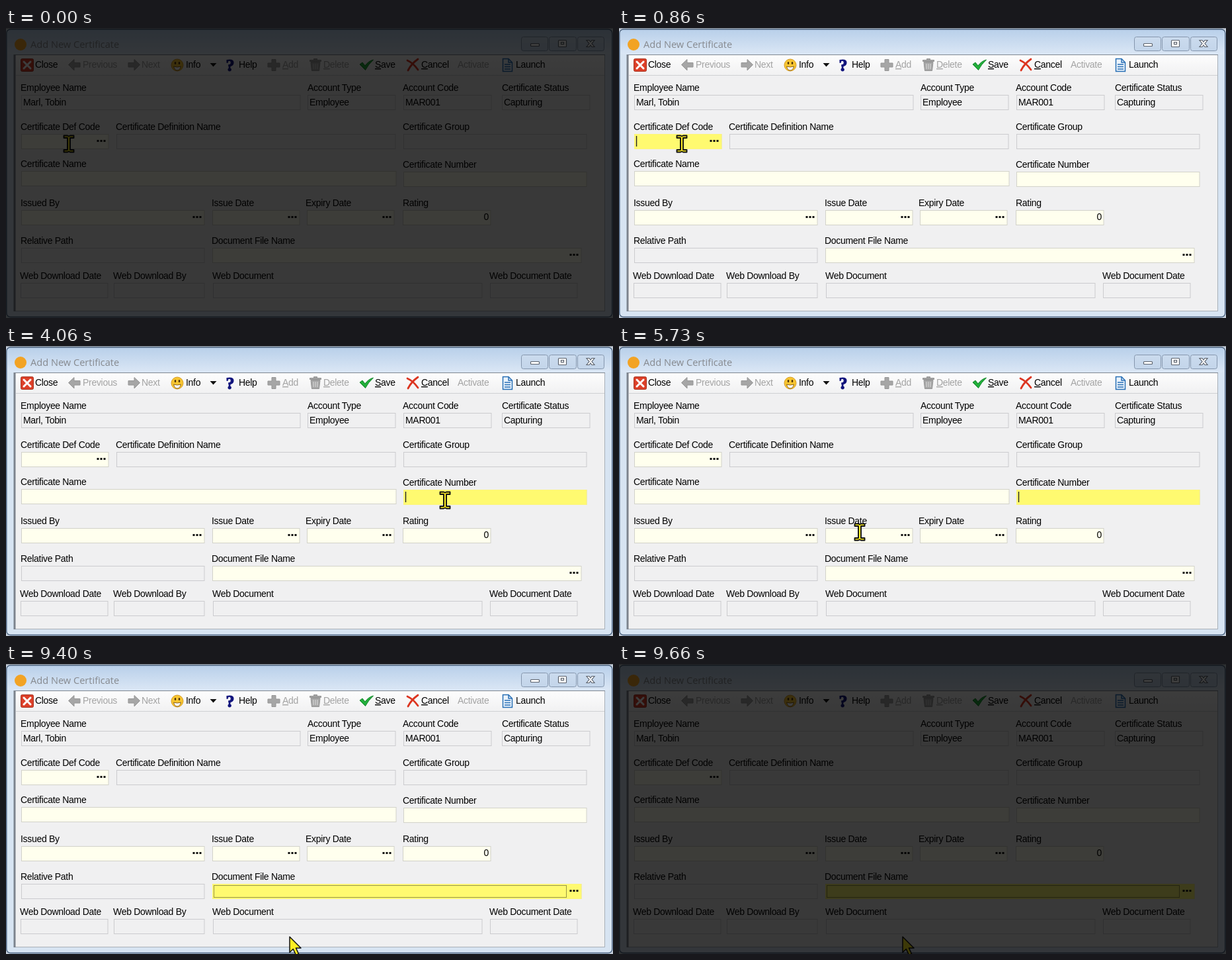
An HTML page that plays this animation: 918x438 px, repeating every 9.73 s.

```html
<!DOCTYPE html>
<html lang="en">
<head>
<meta charset="utf-8">
<title>Add New Certificate</title>
<style>
  html, body { margin: 0; width: 100%; height: 100%; overflow: hidden; background: #000; }
  svg { display: block; width: 918px; height: 438px; }
  text { font: 14px "Liberation Sans", Arial, sans-serif; letter-spacing: -.3px; fill: #000; white-space: pre; }
  .title { font: 14.6px "Open Sans", "Noto Sans", sans-serif; letter-spacing: 0; fill: #86898e; }
  .off { fill: #a3a3a3; }
  .u { text-decoration: underline; }
  .help { font: bold 26px "Liberation Serif", serif; fill: #10137c; stroke: #10137c; stroke-width: 1.2; }
</style>
</head>
<body>
<svg id="stage" viewBox="0 0 918 438" xmlns="http://www.w3.org/2000/svg">
  <defs>
    <linearGradient id="bar" x2="0" y2="1">
      <stop offset="0" stop-color="#fdfdfd"/><stop offset="1" stop-color="#f1f1f2"/>
    </linearGradient>
    <linearGradient id="head" x2="0" y2="1">
      <stop offset="0" stop-color="#b9d0ea"/><stop offset="1" stop-color="#dbe7f5"/>
    </linearGradient>
    <linearGradient id="btn" x2="0" y2="1">
      <stop offset="0" stop-color="#cbdbee"/><stop offset="1" stop-color="#c3d5ea"/>
    </linearGradient>
  </defs>

  <!-- window -->
  <rect width="918" height="438" fill="#c3ccd8"/>
  <path d="M0 .5H918" stroke="#8f949b"/>
  <rect x=".8" y="2" width="916" height="434.5" rx="6" fill="#d7e4f2" stroke="#48617f" stroke-width="1.4"/>
  <rect x="2" y="3" width="913.5" height="37" rx="5" fill="url(#head)"/>
  <rect x="12.5" y="40.5" width="893" height="387" fill="#f0f0f1" stroke="#a9b0b8"/>
  <path d="M13 40V428" stroke="#7c838d" stroke-width="3"/>
  <path d="M12 40.5H906" stroke="#7f8690"/>
  <rect x="15" y="41" width="890" height="30" fill="url(#bar)"/>
  <path d="M15 71.5H905" stroke="#cfd0d3"/>
  <circle cx="22" cy="25" r="9" fill="#f2a324"/>
  <text class="title" x="37" y="30">Add New Certificate</text>

  <!-- window buttons -->
  <g fill="url(#btn)" stroke="#8596ad">
    <rect x="779.5" y="13.5" width="40" height="21" rx="3"/>
    <rect x="821.5" y="13.5" width="41" height="21" rx="3"/>
    <rect x="864.5" y="13.5" width="40" height="21" rx="3"/>
  </g>
  <g fill="#fff" stroke="#5c636e" stroke-width="1.2">
    <rect x="793.5" y="23.5" width="13" height="4" rx="1"/>
    <rect x="835.5" y="18.5" width="12" height="10" rx="1"/>
    <rect x="839.5" y="21.5" width="4" height="3"/>
    <path d="M878 18.5h4l2 2.5 2-2.5h4l-4 5 4 5h-4l-2-2.5-2 2.5h-4l4-5z"/>
  </g>

  <!-- toolbar icons -->
  <rect x="22.5" y="46.5" width="19" height="19" rx="2" fill="#dc4029" stroke="#a93422"/>
  <path d="M27 51L37 61M37 51L27 61" stroke="#fff" stroke-width="3" stroke-linecap="round"/>
  <g fill="#a6a6a6" stroke="#959595">
    <path d="M94.5 55.5L103 47.5V52.5H112V59H103V64Z"/>
    <path d="M202.5 55.5L194 47.5V52.5H185V59H194V64Z"/>
    <path d="M402 47.5H408V53H414V59H408V64.5H402V59H396V53H402Z"/>
    <path d="M461 51.5H475L473.5 64.5H462.5Z"/>
    <path d="M459.5 48.5H476.5V50.5H459.5ZM465.5 46.5H470.5V48.5H465.5Z"/>
  </g>
  <path d="M465 54V62M468 54V62M471 54V62" stroke="#dedede"/>
  <circle cx="259" cy="56" r="9" fill="#f7c531" stroke="#d69c25"/>
  <path d="M253.5 58Q259 60 264.5 58Q263 64 259 64T253.5 58Z" fill="#fff" stroke="#8a611a"/>
  <ellipse cx="256" cy="53" rx="1.3" ry="2" fill="#4b300a"/>
  <ellipse cx="262" cy="53" rx="1.3" ry="2" fill="#4b300a"/>
  <path d="M308.5 53H318.5L313.5 58.5Z" fill="#111"/>
  <text class="help" x="332.5" y="64.5">?</text>
  <path d="M535 55L539 52L543 57Q548 50 555.5 48Q548 55 543.5 63.5Z" fill="#21ae3a" stroke="#13862a"/>
  <path d="M607 49Q616 53 623 63M623 47Q613 54 608 64" fill="none" stroke="#dc3520" stroke-width="2.8" stroke-linecap="round"/>
  <path d="M751.5 46.5H760L765.5 52V65.5H751.5Z" fill="#eaf3fc" stroke="#286fb5" stroke-width="1.5"/>
  <path d="M760 47V52H765M754 55H763M754 58.5H763M754 62H763" fill="none" stroke="#286fb5" stroke-width="1.5"/>

  <g id="form"></g>
  <g id="focus">
    <rect id="glow" fill="#fffa70" stroke="#fdf57a"/>
    <rect id="dotted" x="314.5" y="334.5" width="533" height="18" fill="none" stroke="#33331a" stroke-dasharray="1 1"/>
    <g id="glowDots"></g>
    <path id="caret" stroke="#222" stroke-width="1.4"/>
  </g>
  <g id="pointer" fill="#ffee22" stroke="#111" stroke-width="1.5" stroke-linejoin="round">
    <path id="arrow" d="M0 0V23.5L5.3 18.5L9.5 27.5L13.5 25.6L9.500 17H17Z"/>
    <path id="beam" stroke-width="1.9" d="M-7.5-12.5H-2L0-11.5L2-12.5H7.5V-9H2V9H7.500V12.5H2L0 11.5L-2 12.5H-7.5V9H-2V-9H-7.5Z"/>
  </g>
  <rect id="shade" width="918" height="438"/>
</svg>
<script>
const $ = id => document.getElementById(id);
const LOOP = 9730, FPS = 15;

function add(parent, tag, attrs, content) {
  const el = document.createElementNS('http://www.w3.org/2000/svg', tag);
  for (const key in attrs) el.setAttribute(key, attrs[key]);
  if (content !== undefined) el.textContent = content;
  parent.append(el);
  return el;
}
const set = (el, attrs) => { for (const key in attrs) el.setAttribute(key, attrs[key]); };
const show = (el, on) => { el.style.display = on ? '' : 'none'; };

// label, label x, baseline, box x, y, width, height, kind, value
const EDIT = 'edit', PICK = 'pick', READ = 'read';
const fields = [
  ['Employee Name', 22, 95, 23, 101, 422, 22, READ, 'Marl, Tobin'],
  ['Account Type', 456, 95, 456, 101, 133, 22, READ, 'Employee'],
  ['Account Code', 600, 95, 601, 101, 133, 22, READ, 'MAR001'],
  ['Certificate Status', 750, 95, 750, 101, 133, 22, READ, 'Capturing'],
  ['Certificate Def Code', 22, 154, 23, 160, 132, 22, PICK],
  ['Certificate Definition Name', 166, 154, 167, 160, 422, 22, READ],
  ['Certificate Group', 600, 154, 601, 160, 277, 22, READ],
  ['Certificate Name', 22, 210, 23, 216, 567, 22, EDIT],
  ['Certificate Number', 600, 211, 601, 217, 277, 22, EDIT],
  ['Issued By', 22, 269, 23, 275, 277, 22, PICK],
  ['Issue Date', 311, 269, 312, 275, 132, 22, PICK],
  ['Expiry Date', 453, 269, 455, 275, 132, 22, PICK],
  ['Rating', 600, 269, 600, 275, 133, 22, EDIT],
  ['Relative Path', 22, 326, 23, 332, 277, 22, READ],
  ['Document File Name', 311, 326, 312, 332, 558, 22, PICK],
  ['Web Download Date', 21, 379, 22, 385, 132, 22, READ],
  ['Web Download By', 162, 379, 163, 385, 137, 22, READ],
  ['Web Document', 312, 379, 313, 385, 407, 22, READ],
  ['Web Document Date', 731, 379, 732, 385, 132, 22, READ],
].map(([label, lx, ly, x, y, w, h, kind, value]) => ({ label, lx, ly, x, y, w, h, kind, value }));
const byName = name => fields.find(f => f.label === name);
const code = byName('Certificate Def Code');
const number = byName('Certificate Number');
const doc = byName('Document File Name');

const form = $('form');
function drawDots(parent, f) {
  for (let i = 0; i < 3; i++)
    add(parent, 'rect', { x: f.x + f.w - 17.5 + i * 5, y: f.y + 9, width: 3, height: 3, fill: '#111' });
}
for (const f of fields) {
  const grey = f.kind === READ;
  add(form, 'text', { x: f.lx, y: f.ly }, f.label);
  add(form, 'rect', { x: f.x + .5, y: f.y + .5, width: f.w - .5, height: f.h,
    fill: grey ? '#f0f0f1' : '#ffffee', stroke: grey ? '#cbcbce' : '#d2d2ca' });
  if (f.value) add(form, 'text', { x: f.x + 3, y: f.y + 16 }, f.value);
  if (f.kind === PICK) drawDots(form, f);
}
add(form, 'text', { x: 730, y: 290, 'text-anchor': 'end' }, '0');

// caption, x, enabled, first letter underlined
const tools = [
  ['Close', 44, 1], ['Previous', 116, 0], ['Next', 205, 0], ['Info', 272, 1], ['Help', 352, 1],
  ['Add', 418, 0, 1], ['Delete', 480, 0, 1], ['Save', 558, 1, 1], ['Cancel', 628, 1, 1],
  ['Activate', 683, 0], ['Launch', 771, 1],
];
for (const [caption, x, on, key] of tools) {
  const el = add(form, 'text', { x, y: 60, class: on ? '' : 'off' });
  if (key) add(el, 'tspan', { class: 'u' }, caption[0]);
  el.append(key ? caption.slice(1) : caption);
}
drawDots($('glowDots'), code);
drawDots($('glowDots'), doc);
const dots = [...$('glowDots').children];

// start, end, target x, target y
const START = [95, 175];
const moves = [
  [1330, 1860, 265, 198],
  [2330, 3860, 664, 233],
  [4400, 5730, 364, 281],
  [6600, 7530, 478, 346],
  [8200, 9200, 429, 412],
];
const clamp = v => Math.max(0, Math.min(1, v));
const ease = v => v * v * (3 - 2 * v);

function pointerAt(t) {
  let [x, y] = START;
  for (const [from, to, tx, ty] of moves) {
    const p = ease(clamp((t - from) / (to - from)));
    x += (tx - x) * p;
    y += (ty - y) * p;
  }
  return [x, y];
}

function focusAt(t) {
  if (t < 860) return null;
  return t < 4000 ? code : t < 7660 ? number : doc;
}

function render(t) {
  const f = focusAt(t);
  show($('focus'), f);
  if (f) {
    set($('glow'), { x: f.x + .5, y: f.y + .5, width: f.w - .5, height: f.h });
    set($('caret'), { d: `M${f.x + 3.5} ${f.y + 3}v16` });
  }
  const blinkFrom = f === code ? 530 : 4000;
  show($('caret'), f !== doc && Math.floor((t - blinkFrom) / 800) % 2 === 0);
  show($('dotted'), f === doc);
  dots.forEach((d, i) => show(d, f === (i < 3 ? code : doc)));

  const [x, y] = pointerAt(t);
  const typing = fields.some(b => b !== doc && x >= b.x && x <= b.x + b.w && y >= b.y && y <= b.y + b.h);
  set($('pointer'), { transform: `translate(${x.toFixed(1)} ${y.toFixed(1)})` });
  show($('beam'), typing);
  show($('arrow'), !typing);

  const light = Math.min(clamp(t / 333), clamp((9667 - t) / 267));
  set($('shade'), { opacity: .76 * (1 - light) });
}

// hold each picture for one fifteenth of a second
function tick(now) {
  const step = Math.floor((now % LOOP + 6.7) * FPS / 1000);
  render(Math.min(step, 145) * 1000 / FPS + .01);
  requestAnimationFrame(tick);
}
render(0);
requestAnimationFrame(tick);
</script>
</body>
</html>
```
